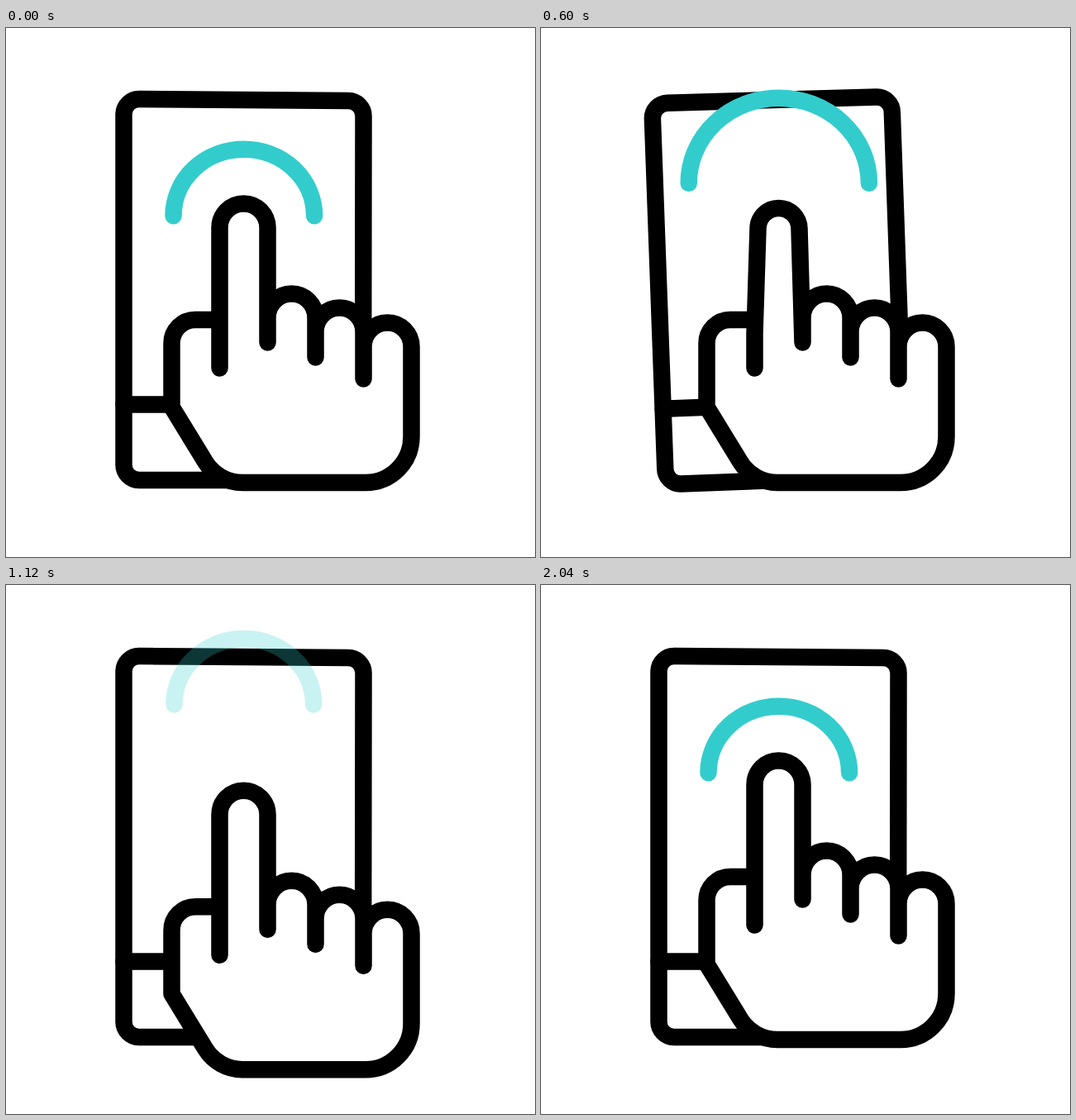
Recreate the animation shown at these times as an HTML page. Size 640x640 px, loop 2.12 s.

```html
<!DOCTYPE html>
<html lang="en">
<head>
<meta charset="utf-8">
<title>Tap and swipe</title>
<style>
  html, body { margin: 0; width: 100%; height: 100%; overflow: hidden; background: #fff; }
  svg { display: block; width: 100%; height: 100%; }
  path { stroke: #000; stroke-width: 20.5; stroke-linecap: round; stroke-linejoin: round; fill: #fff; }
  #swipe { stroke: #3cc; fill: none; }
</style>
</head>
<body>
<svg viewBox="0 0 640 640">
  <g id="device">
    <path d="M142.5 104A18.5 18.5 0 0 1 161 86L414 88A18.5 18.5 0 0 1 432.5 107L432 528A18.5 18.5 0 0 1 413.5 547H161A18.5 18.5 0 0 1 142.5 528Z"/>
    <path d="M142.5 455.5H215"/>
  </g>
  <path id="swipe"/>
  <path id="hand"/>
</svg>
<script>
const LOOP = 2120, STEP = 40;
const REST_END = 80, REST_START = 2040; // the pose rests across the loop seam
const BIRTH = 1600;                     // when a new swipe arc appears
const GROW = REST_START - BIRTH;
const MID = 287.5;

const [device, swipe, hand] = ['device', 'swipe', 'hand'].map(id => document.getElementById(id));

const clamp = (v, lo, hi) => Math.min(hi, Math.max(lo, v));

// Eased rise from 0 to 1 between two times.
function ramp(t, from, to) {
  const u = clamp((t - from) / (to - from), 0, 1);
  return u * u * (3 - 2 * u);
}

// Eased rise to 1 at the peak, then back to 0.
const bump = (t, from, peak, to) => ramp(t, from, peak) - ramp(t, peak, to);

// The index finger gets thinner towards its tip as it presses.
function handPath(press) {
  const r = 29 - 4 * press, y = 241.5 + 1.5 * press;
  return 'M258.5 353H229A28.5 28.5 0 0 0 200.5 381.5V458.5L241.2 525' +
    'A52.5 52.5 0 0 0 286 550H435A55.5 55.5 0 0 0 490.5 494.5' +
    'V385.5A29 29 0 0 0 432.5 385.5V424.5' +
    'V367.5A29 29 0 0 0 374.5 367.5V398.5' +
    'V350.5A29 29 0 0 0 316.5 350.5V380.5' +
    `L${MID + r} ${y}A${r} ${r} 0 0 0 ${MID - r} ${y}L258.5 370V411.5`;
}

// The arc drifts up from the fingertip while its width wobbles.
function drawSwipe(age) {
  const y = 258 - 0.067 * age - 6.5e-6 * age * age;
  const r = 76.8 + 8.5 * ramp(age, 0, GROW)
    - 13 * bump(age, 480, 660, 980)
    + 24.2 * bump(age, 660, 980, 1300)
    - 4.3 * bump(age, 980, 1300, 1560);
  const fade = Math.min(age / GROW, (1595 - age) / 435);
  swipe.setAttribute('d', `M${MID + 0.3 - r} ${y}a${r} ${r * 0.944} 0 0 1 ${2 * r} 0`);
  swipe.setAttribute('opacity', clamp(fade, 0, 1));
}

function draw(t) {
  const tilt = -8 * bump(t, 140, 420, 690);
  const drop = 38 * (ramp(t, 600, 1200) - ramp(t, 1275, 1855));
  const press = ramp(t, 160, 580) - ramp(t, 620, 880);

  device.setAttribute('transform', `rotate(${tilt} ${MID} 316.5)`);
  hand.setAttribute('transform', `translate(0 ${drop})`);
  hand.setAttribute('d', handPath(press));
  drawSwipe(t < BIRTH ? t - REST_END + GROW : t - BIRTH);
}

function tick() {
  const t = Math.floor(performance.now() % LOOP / STEP) * STEP;
  draw(clamp(t, REST_END, REST_START));
  requestAnimationFrame(tick);
}
tick();
</script>
</body>
</html>
```
